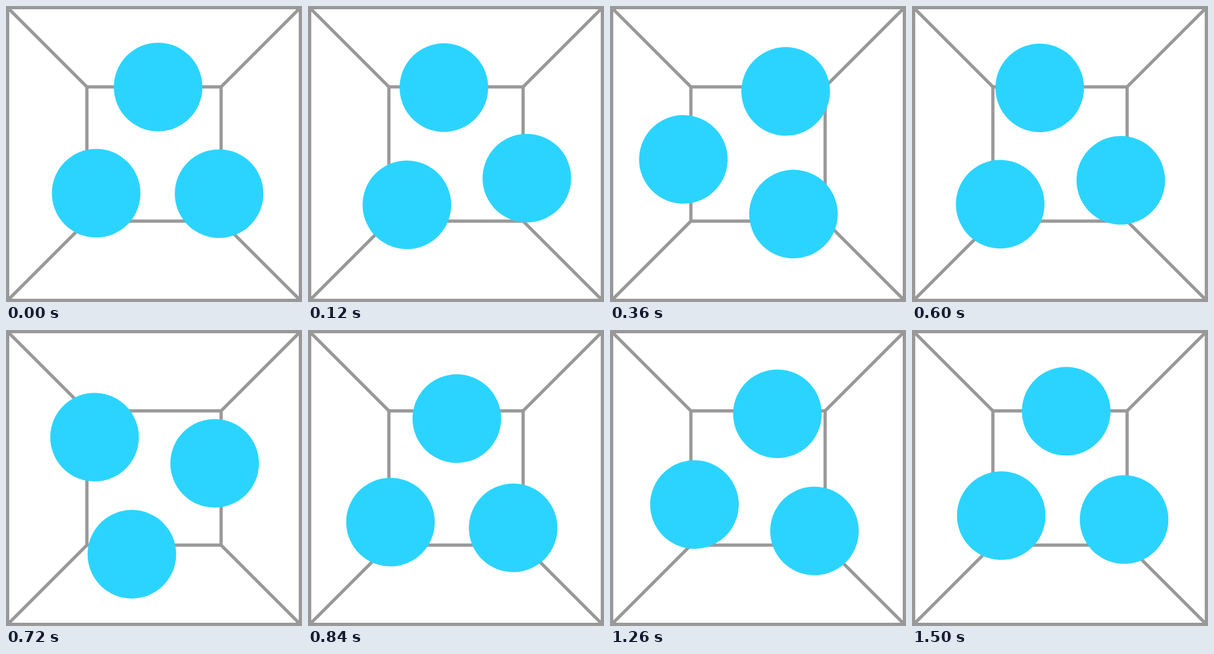
Recreate the animation shown at these times as an HTML page. Size 453x453 px, loop 1.56 s.

```html
<!DOCTYPE html>
<html lang="en">
<head>
<meta charset="utf-8">
<title>Turning balls</title>
<style>
  html, body { margin: 0; width: 100%; height: 100%; overflow: hidden; background: #fff; }
  svg { display: block; width: 100%; height: 100%; }
  .room { fill: none; stroke: #999; stroke-width: 5; }
  .balls { fill: #2bd4ff; }
</style>
</head>
<body>
<svg viewBox="0 0 453 453">
  <g class="room">
    <rect x="2.5" y="2.5" width="448" height="448"/>
    <rect x="123.8" y="123.8" width="205.4" height="205.4"/>
    <path d="M2.5 2.5L123.8 123.8M450.5 2.5L329.2 123.8M2.5 450.5L123.8 329.2M450.5 450.5L329.2 329.2"/>
  </g>
  <g class="balls" id="balls">
    <circle cx="232.8" cy="124" r="67.8"/>
    <circle cx="138" cy="286.5" r="67.8"/>
    <circle cx="326.1" cy="287.2" r="67.8"/>
  </g>
</svg>
<script>
  const LOOP = 1560, STEP = 60;
  const REST = 528, PEAK = 930;      // slowest and fastest moments, ms
  const FIRST = 125.5, SECOND = 186; // degrees turned up to each of them
  const PIVOT = '224.3 235.7';
  const balls = document.getElementById('balls');

  const swing = x => (1 - Math.cos(Math.PI * x ** 1.065)) / 2;

  // Swing to a near rest, speed up, then coast out to a full turn.
  function turned(t) {
    if (t < REST) return FIRST * swing(t / REST);
    if (t < PEAK) return FIRST + SECOND * ((t - REST) / (PEAK - REST)) ** 2;
    return 360 - 8 * Math.expm1((LOOP - t) / 324);
  }

  const start = performance.now();

  function draw() {
    const t = Math.max(0, performance.now() - start) % LOOP;
    const held = Math.floor(t / STEP) * STEP;
    balls.setAttribute('transform', `rotate(${-turned(held)} ${PIVOT})`);
    requestAnimationFrame(draw);
  }
  draw();
</script>
</body>
</html>
```
